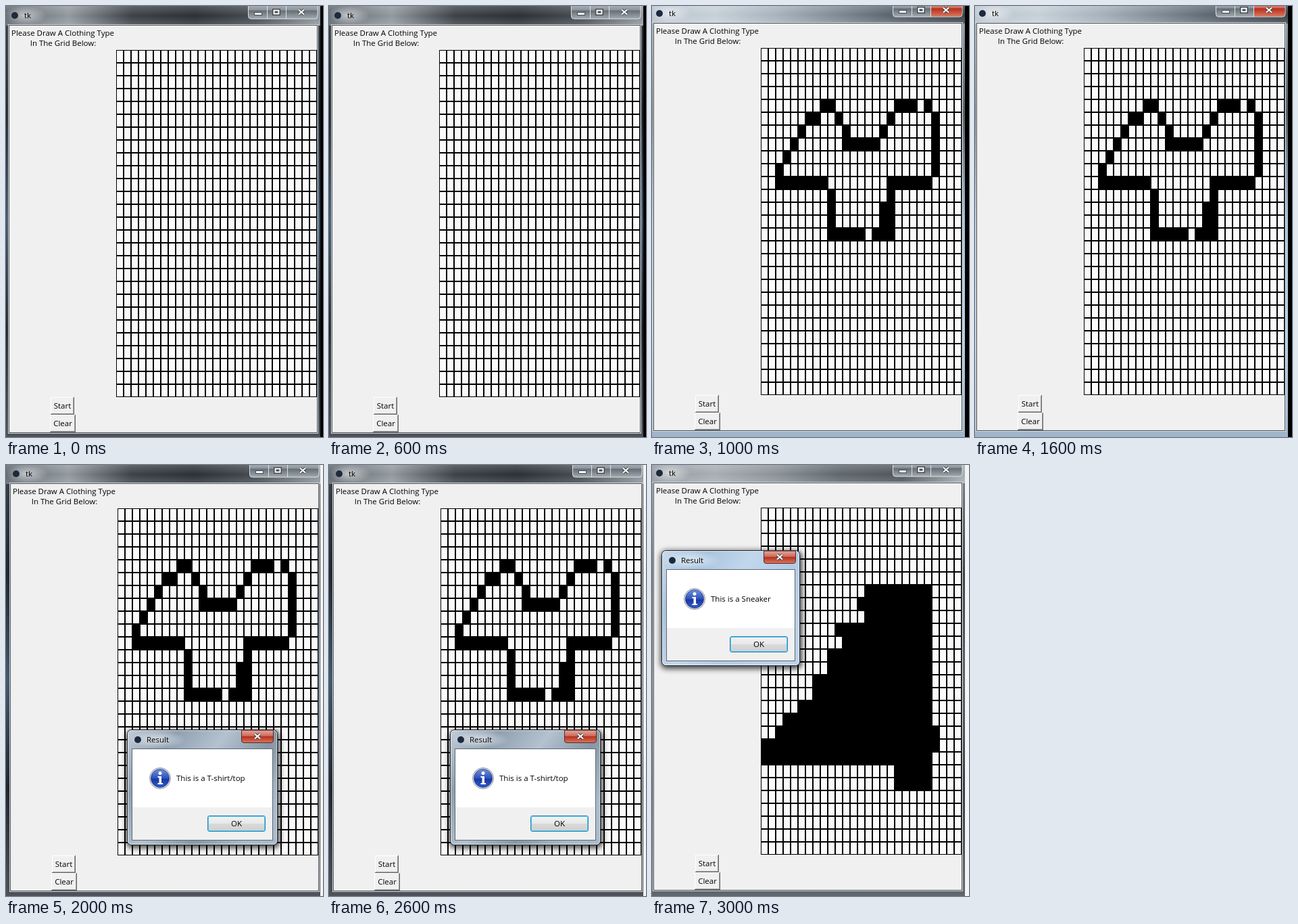
Write an HTML page that moves like this. It is 469 px wide and 637 px high and loops after 4 s.

```html
<!DOCTYPE html>
<html lang="en">
<head>
<meta charset="utf-8">
<title>Clothing sketch</title>
<style>
  html, body { margin: 0; width: 100%; height: 100%; overflow: hidden; background: #000; }
  svg { display: block; width: 469px; height: 637px; }
  text { font: 11.5px "Open Sans", "Noto Sans", sans-serif; fill: #000; }
  .mid { text-anchor: middle; }
  .crisp { shape-rendering: crispEdges; }
</style>
</head>
<body>
<svg id="stage" viewBox="0 0 469 637" xmlns="http://www.w3.org/2000/svg">
  <defs>
    <pattern id="cell" x="163" y="65" width="11" height="19" patternUnits="userSpaceOnUse">
      <rect class="crisp" width="11" height="19" fill="#000"/>
      <rect class="crisp" x="1" y="1" width="9" height="17" fill="#fafafa"/>
    </pattern>
    <linearGradient id="bar"></linearGradient>
    <linearGradient id="shine" x2="0" y2="1">
      <stop stop-color="#fff" stop-opacity=".22"/>
      <stop offset=".5" stop-color="#fff" stop-opacity=".04"/>
      <stop offset="1" stop-color="#fff" stop-opacity=".2"/>
    </linearGradient>
    <linearGradient id="side" x2="0" y2="1"></linearGradient>
    <linearGradient id="grey" x2="0" y2="1">
      <stop stop-color="#b9bfc5"/><stop offset=".45" stop-color="#8f979e"/>
      <stop offset=".5" stop-color="#666e76"/><stop offset="1" stop-color="#a2aab1"/>
    </linearGradient>
    <linearGradient id="red" x2="0" y2="1">
      <stop stop-color="#e3a69a"/><stop offset=".45" stop-color="#cf6c5c"/>
      <stop offset=".5" stop-color="#b5301d"/><stop offset="1" stop-color="#d9775f"/>
    </linearGradient>
    <linearGradient id="push" x2="0" y2="1">
      <stop stop-color="#f3f3f3"/><stop offset=".5" stop-color="#e8e8e8"/>
      <stop offset=".5" stop-color="#dadada"/><stop offset="1" stop-color="#cfcfcf"/>
    </linearGradient>
    <linearGradient id="glass" x2="1" y2=".6"></linearGradient>
    <linearGradient id="ball" x2="0" y2="1">
      <stop stop-color="#6f92dd"/><stop offset=".5" stop-color="#2d50bd"/>
      <stop offset=".55" stop-color="#1a37a4"/><stop offset="1" stop-color="#2f5fc8"/>
    </linearGradient>
    <radialGradient id="glow">
      <stop stop-color="#fff" stop-opacity=".6"/><stop offset="1" stop-color="#fff" stop-opacity="0"/>
    </radialGradient>
    <filter id="blur" x="-20%" y="-20%" width="140%" height="140%">
      <feGaussianBlur stdDeviation="4"/>
    </filter>
  </defs>
  <g id="scene"></g>
</svg>
<script>
const scene = document.getElementById("scene");

const rect = (x, y, w, h, fill, more = "") =>
  `<rect x="${x}" y="${y}" width="${w}" height="${h}" fill="${fill}" ${more}/>`;
const crisp = (x, y, w, h, fill) => rect(x, y, w, h, fill, 'class="crisp"');
const text = (x, y, s, mid) => `<text x="${x}" y="${y}"${mid ? ' class="mid"' : ""}>${s}</text>`;
const move = (x, y, body) => `<g transform="translate(${x} ${y})">${body}</g>`;

// Each run is [row, first column, last column].
const shirt = [
  [4, 8, 9], [4, 18, 20], [4, 22, 22], [5, 6, 7], [5, 10, 10], [5, 17, 17],
  [6, 5, 5], [6, 11, 11], [6, 16, 16], [7, 4, 4], [7, 11, 15], [8, 3, 3], [9, 2, 2],
  [10, 2, 8], [10, 17, 22], [11, 9, 9], [11, 17, 17], [12, 9, 9], [12, 16, 17],
  [13, 9, 9], [13, 16, 17], [14, 9, 13], [14, 15, 17],
  ...[5, 6, 7, 8, 9].map(r => [r, 23, 23])
];
const shoeLeft = [14, 13, 14, 10, 11, 9, 9, 7, 7, 5, 3, 2, 0, 0, 18, 18];
const shoe = shoeLeft.map((c, i) => [i + 6, c, i === 11 || i === 12 ? 23 : 22]);

const darkBar = ["#555e66", "#8d959b", "#343a40", "#23282d", "#3e454b", "#8b9299"];
const darkSide = ["#3b4249", "#20262d", "#42586f", "#20252b", "#4d5358"];
const views = [
  { dx: 0, dy: 0, runs: [], bar: darkBar, side: darkSide, edge: "#000" },
  { dx: -2, dy: -3, runs: shirt, hot: true, edge: "#000",
    bar: ["#b4bfca", "#c4ced7", "#a3afba", "#77838e", "#4b555f", "#323a42"],
    side: ["#9aa6b2", "#525d68", "#a9c3dc", "#b6d0e8", "#9fb4c8"] },
  { dx: 2, dy: -1, runs: shirt, bar: darkBar, side: darkSide, edge: "#f4f4f4",
    box: { x: 179, y: 391, w: 223, msg: "This is a T-shirt/top",
           glass: ["#c3ced9", "#8fa0b1", "#b4c2cf", "#8797a7", "#a9bbcb"] } },
  { dx: -2, dy: -2, runs: shoe, edge: "#f4f4f4",
    bar: ["#8c949b", "#a4abb1", "#858d94", "#596168", "#474e54", "#a4abb1"],
    side: ["#7b848c", "#3a4249", "#59636c", "#353c43", "#60676d"],
    box: { x: 14, y: 126, w: 205, msg: "This is a Sneaker",
           glass: ["#c8dbee", "#a9c4df", "#c1d7ec", "#b1cce6", "#bcd3ea"] } }
];

function setStops(id, colors) {
  document.getElementById(id).innerHTML = colors
    .map((c, i) => `<stop offset="${i / (colors.length - 1)}" stop-color="${c}"/>`).join("");
}

const cross = (x, y) =>
  [["#3a3f45", 4], ["#fff", 2.2]].map(([c, w]) =>
    `<path d="M${x - 4} ${y - 3.5}l8 7m0-7l-8 7" stroke="${c}" stroke-width="${w}" fill="none"/>`).join("");

function raised(x, y, w, label) {
  return crisp(x, y, w, 26, "#696969") + crisp(x, y, w - 1, 25, "#fff") +
    crisp(x + 1, y + 1, w - 2, 24, "#a0a0a0") + crisp(x + 1, y + 1, w - 3, 23, "#f0f0f0") +
    text(x + w / 2, y + 17, label, true);
}

function controls(hot) {
  return `<path d="M358.5-5V15q0 4 4 4H457q4 0 4-4V-5Z" fill="url(#grey)" stroke="#dce1e6"/>` +
    (hot ? `<path d="M414.5-5V18.5H457q3.500 0 3.500-3.500V-5Z" fill="url(#red)"/>` : "") +
    crisp(386, 0, 1, 19, "#dce1e6") + crisp(414, 0, 1, 19, "#dce1e6") +
    rect(367.5, 9.5, 11, 4, "#fff", 'stroke="#454b51"') +
    rect(396.5, 6.5, 7, 5, "none", 'stroke="#454b51" stroke-width="5"') +
    rect(396.500, 6.500, 7, 5, "none", 'stroke="#fff" stroke-width="2"') +
    cross(437, 9);
}

function mainWindow(v) {
  const fills = v.runs.map(([r, a, b]) =>
    crisp(163 + 11 * a, 65 + 19 * r, 11 * (b - a + 1), 19, "#000")).join("");
  return crisp(0, 0, 469, 637, v.edge) +
    crisp(0, 0, 465 + Math.min(v.dx, 0), 637, "url(#side)") +
    crisp(0, 0, 465 + Math.min(v.dx, 0), 29 + v.dy, "url(#bar)") +
    crisp(0, 0, 465 + Math.min(v.dx, 0), 29 + v.dy, "url(#shine)") +
    move(v.dx, v.dy,
      `<ellipse cx="28" cy="14" rx="32" ry="14" fill="url(#glow)"/>` +
      `<circle cx="13" cy="14" r="5" fill="#1d2a3d"/>` + text(27, 18, "tk") +
      controls(v.hot) +
      crisp(3, 27, 459, 605, "#d5dade") + crisp(4, 28, 457, 603, "#4b5156") +
      crisp(5, 29, 455, 601, "#f0f0f0") +
      text(84, 44, "Please Draw A Clothing Type", true) +
      text(84.5, 59, "In The Grid Below:", true) +
      crisp(163, 65, 297, 513, "url(#cell)") + fills +
      raised(66, 578, 35, "Start") + raised(65, 604, 38, "Clear"));
}

function dialog({ x, y, w, msg }) {
  return move(x, y,
    rect(-1, 1, w + 4, 174, "#000", 'rx="8" opacity=".75" filter="url(#blur)"') +
    rect(.5, .5, w - 1, 170, "url(#glass)", 'rx="6" stroke="#1f262d"') +
    rect(1.5, 1.5, w - 3, 168, "none", 'rx="5" stroke="#fff" stroke-opacity=".65"') +
    `<ellipse cx="45" cy="15" rx="42" ry="13" fill="url(#glow)"/>` +
    `<circle cx="16" cy="15" r="5" fill="#1d2a3d"/>` + text(29, 19, "Result") +
    `<path d="M${w - 53.5} 1V16q0 3.500 3.500 3.500h40q3.500 0 3.500-3.500V1Z" fill="url(#red)" stroke="#5b2a27"/>` +
    cross(w - 30, 10) +
    crisp(7, 28, w - 14, 136, "#5c6873") + crisp(8, 29, w - 16, 134, "#f0f0f0") +
    crisp(8, 29, w - 16, 86, "#fff") +
    `<circle cx="49" cy="72" r="15.500" fill="#e4e7ec" stroke="#8d939c"/>` +
    `<circle cx="49" cy="72" r="13.500" fill="url(#ball)" stroke="#1b2f85" stroke-width=".8"/>` +
    `<circle cx="49" cy="64.500" r="2.500" fill="#fff"/>` +
    `<path d="M45.500 69H51V79H53V81H45.500V79H47.500V71H45.500Z" fill="#fff"/>` +
    text(73, 76, msg) +
    rect(w - 103.5, 127.5, 85, 23, "url(#push)", 'rx="2.500" stroke="#3c7fb1"') +
    rect(w - 102.5, 128.5, 83, 21, "none", 'rx="1.500" stroke="#46d0f4"') +
    text(w - 61, 143, "OK", true));
}

let shown = -1;
function draw(ms) {
  const n = Math.floor(ms / 1000) % views.length;
  if (n === shown) return;
  shown = n;
  const v = views[n];
  setStops("bar", v.bar);
  setStops("side", v.side);
  if (v.box) setStops("glass", v.box.glass);
  scene.innerHTML = mainWindow(v) + (v.box ? dialog(v.box) : "");
}

const start = performance.now();
function tick() {
  draw(performance.now() - start);
  requestAnimationFrame(tick);
}
tick();
</script>
</body>
</html>
```
